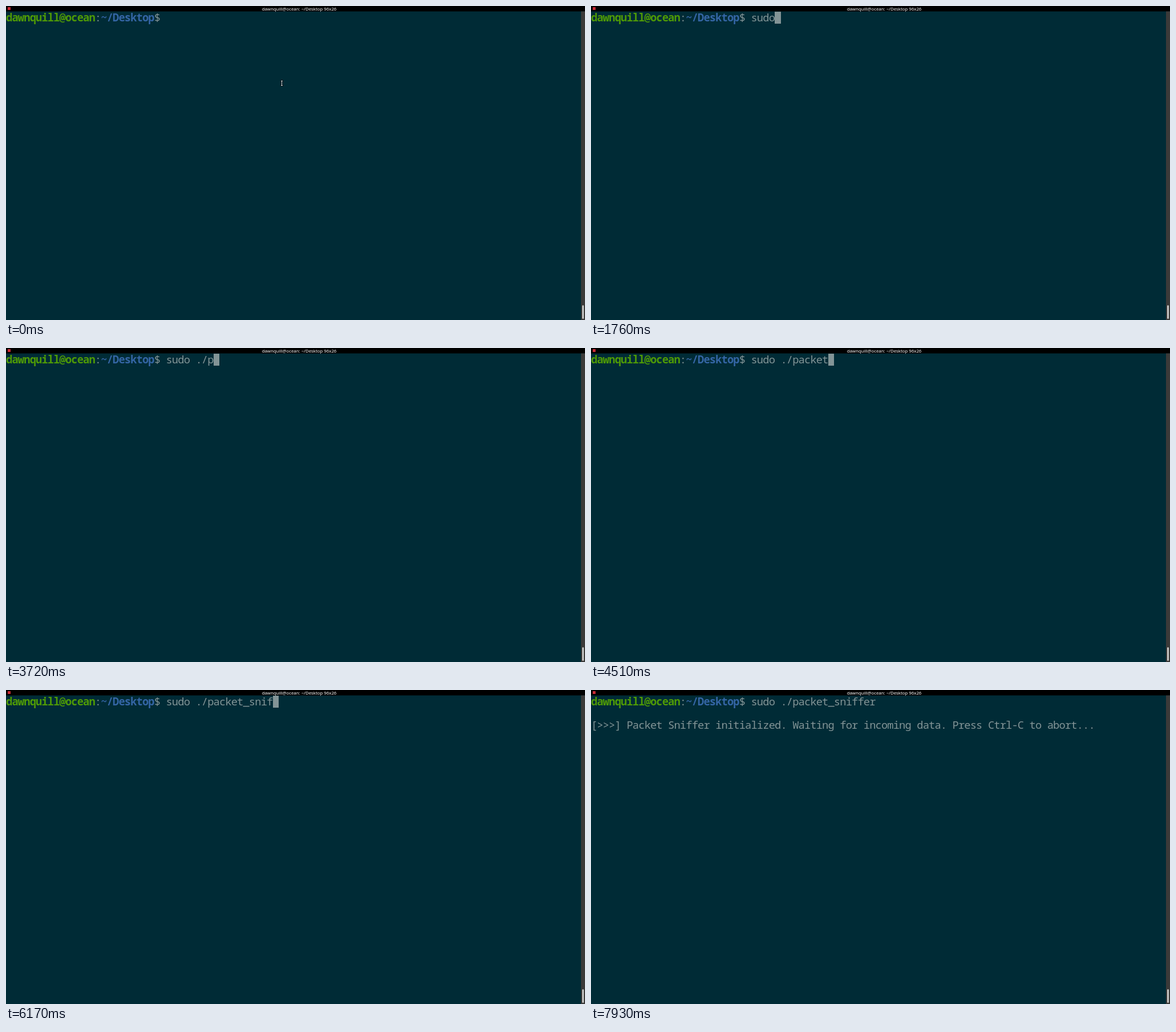
Write an HTML page with a canvas that moves like this. It is 1015 by 551 pixels and loops after 8 s.

```html
<!DOCTYPE html>
<html lang="en">
<head>
<meta charset="utf-8">
<title>Terminal</title>
<style>
  html, body { margin: 0; width: 100%; height: 100%; overflow: hidden; background: #002b36; }
  canvas { display: block; }
</style>
</head>
<body>
<canvas id="stage" width="1015" height="551"></canvas>
<script>
const ctx = document.getElementById('stage').getContext('2d');

const LOOP = 8000;
const CELL_W = 10.385, CELL_H = 20.8, LEFT = 0.5, TOP = 10, BASELINE = 16.8;
const BG = '#002b36', FG = '#839496', GREEN = '#4e9a06', BLUE = '#3465a4';
const MONO = '18.7px "Noto Sans Mono", "DejaVu Sans Mono", monospace';

const USER = 'dawnquill@ocean', DIR = '~/Desktop';
const COMMAND = 'sudo ./packet_sniffer';
const MESSAGE = '[>>>] Packet Sniffer initialized. Waiting for incoming data. Press Ctrl-C to abort...';
const INPUT_COL = USER.length + DIR.length + 3;

// Start times of each typed character
const KEYS = [1290, 1380, 1670, 1760, 2160, 3130, 3230, 3720, 3820, 4210, 4310,
  4310, 4510, 5000, 5690, 5890, 5980, 6170, 6260, 6360, 6460];
// Spans in which the cursor block is lit
const LIT = [[500, 1090], [1290, 2740], [3130, 5590], [5690, 7050], [7240, 7930]];
const MOUSE_STEP = 210, ENTER = 7340, OUTPUT = 7440;

const colX = col => LEFT + col * CELL_W;
const rowY = row => TOP + row * CELL_H;

function rect(color, x, y, w, h) {
  ctx.fillStyle = color;
  ctx.fillRect(x, y, w, h);
}

// Writes one glyph per terminal cell
function write(text, col, row, color = FG, bold = false) {
  ctx.font = (bold ? 'bold ' : '') + MONO;
  ctx.fillStyle = color;
  ctx.textAlign = 'center';
  [...text].forEach((ch, i) =>
    ctx.fillText(ch, colX(col + i + 0.5), rowY(row) + BASELINE));
}

function drawCursor(col, row) {
  const x = Math.round(colX(col)), y = Math.round(rowY(row));
  rect(FG, x, y, Math.round(colX(col + 1)) - x, Math.round(rowY(row + 1)) - y);
}

function drawMouse(x, y) {
  rect('#001218', x - 2, y, 5, 3);
  rect('#001218', x - 2, y + 8, 5, 3);
  rect('#001218', x - 1, y + 2, 3, 7);
  rect('#d5dcde', x - 1, y + 1, 3, 1);
  rect('#d5dcde', x - 1, y + 9, 3, 1);
  rect('#d5dcde', x, y + 2, 1, 7);
}

function drawWindow() {
  rect(BG, 0, 0, 1015, 551);
  rect('#000', 0, 0, 1015, 9.5);
  rect('#c92b35', 3, 2, 5, 5);
  ctx.font = '7.8px "Noto Sans", "Open Sans", sans-serif';
  ctx.fillStyle = '#fff';
  ctx.textAlign = 'center';
  ctx.fillText(USER + ': ' + DIR + ' 96x26', 514, 7.6);
  rect('#3b3a39', 1008, 9.5, 7, 541.5);
  ctx.fillStyle = '#c9c8c6';
  ctx.beginPath();
  ctx.roundRect(1010, 525, 3, 24, 1.5);
  ctx.fill();
}

function drawPrompt() {
  const n = USER.length;
  write(USER, 0, 0, GREEN, true);
  write(':', n, 0);
  write(DIR, n + 1, 0, BLUE, true);
  write('$', n + 1 + DIR.length, 0);
}

function draw(t) {
  const typed = KEYS.filter(k => k <= t).length;
  drawWindow();
  drawPrompt();
  write(COMMAND.slice(0, typed), INPUT_COL, 0);
  if (t >= OUTPUT) write(MESSAGE, 0, 2);
  if (LIT.some(([on, off]) => t >= on && t < off)) {
    if (t >= OUTPUT) drawCursor(0, 4);
    else if (t >= ENTER) drawCursor(0, 1);
    else drawCursor(INPUT_COL + typed, 0);
  }
  if (!typed) drawMouse(t < MOUSE_STEP ? 483 : 484, 130);
}

const start = performance.now();
function tick() {
  draw((performance.now() - start) % LOOP);
  requestAnimationFrame(tick);
}
tick();
</script>
</body>
</html>
```
